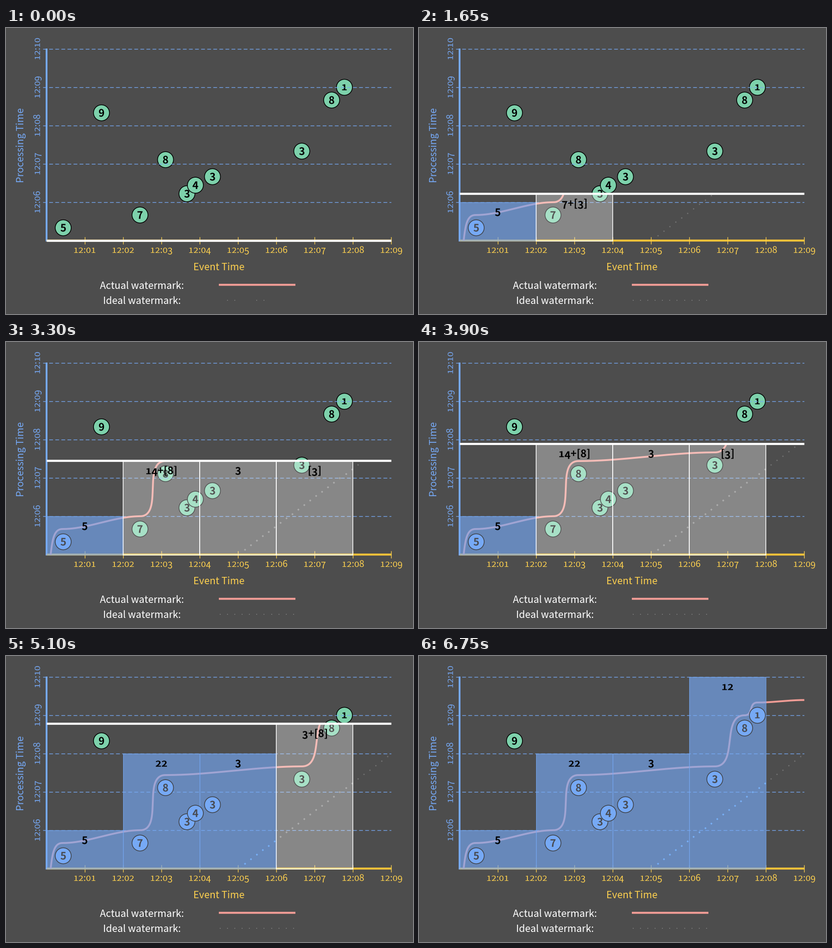
These frames come from a looping animation (893x627 px, 9.75 s). A matplotlib script:

```python
import functools

import matplotlib.pyplot as plt
import numpy as np
from matplotlib.animation import FuncAnimation
from matplotlib.patches import Circle, PathPatch, Rectangle
from matplotlib.path import Path
from matplotlib.textpath import TextPath

W, H, DPI = 893, 627, 64
PT = 72 / DPI                        # points per pixel
FAMILY = "Noto Sans CJK JP"
BACK, BLUE, GREEN, PINK = "#4d4d4d", "#76a9f5", "#7dd1ab", "#f09c95"
AMBER, YELLOW = "#fcc239", "#fdd04f"
X0, Y0, MINUTE_X, MINUTE_Y = 88.5, 466, 84.1, 84
RIGHT = X0 + 9 * MINUTE_X
STEPS = 45                           # frames until the sweep reaches 12:10
FRAMES, INTERVAL = 65, 150
RISE = 5 * MINUTE_Y / STEPS          # pixels the sweep climbs per frame

plt.rcParams["font.family"] = FAMILY
plt.rcParams["lines.scale_dashes"] = False

fig = plt.figure(figsize=(W / DPI, H / DPI), dpi=DPI, facecolor=BACK)
ax = fig.add_axes([0, 0, 1, 1])
ax.set_xlim(0, W)
ax.set_ylim(H, 0)
ax.axis("off")


def line(xs, ys, color, width, z, **kw):
    kw.setdefault("solid_capstyle", "butt")
    return ax.plot(xs, ys, color=color, lw=width * PT, zorder=z, **kw)[0]


def words(x, y, text, color, angle=0):
    ax.text(x, y, text, color=color, fontsize=21.5 * PT, rotation=angle,
            rotation_mode="anchor", ha="center", va="baseline")


# --- old-style figures -------------------------------------------------

@functools.lru_cache(None)
def advance(char, size, font):
    def end(s):
        return TextPath((0, 0), s, size=size, prop=font).get_extents().x1
    return end(char + "1") - end("1")


@functools.lru_cache(None)
def figures(text, size, bold=False):
    """Outline of text (y down), centred on x, baseline at y = 0."""
    font = FAMILY + (":bold" if bold else "")
    parts, x = [], 0
    for char in text:
        glyph = TextPath((0, 0), char, size=size, prop=font)
        v = glyph.vertices.copy()
        if char in "012":
            v[:, 1] *= 0.78
        elif char in "34579":
            v[:, 1] -= 0.17 * size
        v[:, 0] += x
        v[:, 1] *= -1
        parts.append(Path(v, glyph.codes))
        x += advance(char, size, font)
    whole = Path.make_compound_path(*parts)
    return Path(whole.vertices - [x / 2, 0], whole.codes)


def centred(text, x, y):
    path = figures(text, 22.5, True)
    box = path.get_extents()
    mid = [(box.x0 + box.x1) / 2, (box.y0 + box.y1) / 2]
    return Path(path.vertices - mid + [x, y], path.codes)


def add_path(path, color, z):
    return ax.add_patch(PathPatch(path, fc=color, ec="none", lw=0, zorder=z))


# --- static chart ------------------------------------------------------

line([X0, X0], [45, 468], BLUE, 4, 1)
line([X0, RIGHT], [Y0, Y0], AMBER, 4.4, 1.1)

for n in range(1, 10):
    x = X0 + n * MINUTE_X
    line([x, x], [458, 474], YELLOW, 1.4, 1.2)
    path = figures("12:0%d" % n, 19.8)
    add_path(Path(path.vertices + [x, 493], path.codes), YELLOW, 1)

for n in range(1, 6):
    y = Y0 - n * MINUTE_Y
    line([81, RIGHT], [y, y], BLUE, 1.4, 3, dashes=(9.3, 5.7))
    path = figures("12:%02d" % (n + 5), 19.8)
    turned = np.column_stack([path.vertices[:, 1], -path.vertices[:, 0]])
    add_path(Path(turned + [74.5, y], path.codes), BLUE, 1)

words(467, 531, "Event Time", YELLOW)
words(39, 256.5, "Processing Time", BLUE, 90)
words(298.5, 572, "Actual watermark:", "white")
words(298.5, 605, "Ideal watermark:", "white")
line([467, 635], [563, 563], PINK, 4.4, 1)
legend_x = 469.5 + 16.15 * np.arange(11)
legend = line([], [], "#767676", 0, 1, marker="s", ms=2.4 * PT, mew=0)

# --- events ------------------------------------------------------------

# value, x, frame at which the sweep meets it, window (None: too late)
EVENTS = [(5, 125.5, 3, 0), (7, 294, 6, 1), (3, 397, 11, 1), (4, 415.5, 13, 1),
          (3, 453, 15, 2), (8, 350, 19, 1), (3, 649, 21, 3), (9, 209.5, 30, None),
          (8, 714.5, 33, 3), (1, 742.5, 36, 3)]


class Event:
    def __init__(self, order, value, x, step, window):
        y = Y0 - step * RISE
        self.window, self.order = window, order
        self.disc = ax.add_patch(Circle((x, y), 17.5, lw=1.6 * PT))
        self.digit = add_path(centred(str(value), x, y), "black", 2)

    def update(self, i):
        done = self.window is not None and i >= WINDOWS[self.window].close
        z = (6 if done else 2) + self.order * 0.02
        self.disc.set(fc=BLUE if done else GREEN,
                      ec="#3f4248" if done else "black", zorder=z)
        self.digit.set(fc="#484b52" if done else "black", zorder=z + 0.01)


# --- windows -----------------------------------------------------------

class Window:
    def __init__(self, index, close, labels):
        self.left = X0 + 2 * index * MINUTE_X
        self.close, self.labels = close, labels
        self.first = labels[0][0]
        spot = (self.left, Y0)
        self.fill = ax.add_patch(Rectangle(spot, 2 * MINUTE_X, 0, lw=0, zorder=5))
        self.edge = ax.add_patch(Rectangle(spot, 2 * MINUTE_X, 0, fill=False,
                                           zorder=5.5))
        self.label = add_path(centred("0", 0, 0), "black", 8)

    def holds(self, x):
        return (x >= self.left) & (x < self.left + 2 * MINUTE_X)

    def update(self, i):
        parts = (self.fill, self.edge, self.label)
        for part in parts:
            part.set_visible(i >= self.first)
        if i < self.first:
            return
        done = i >= self.close
        top = Y0 - min(i, self.close) * RISE
        self.fill.set(y=top, height=Y0 + 2.2 - top, alpha=0.65 if done else 0.33,
                      fc=BLUE if done else "white")
        self.edge.set(y=top, height=Y0 + (0 if done else 1) - top,
                      ec=BLUE if done else "white",
                      lw=(1.2 if done else 1.6) * PT,
                      alpha=0.8 if done else 1)
        # a finished bottom edge must not cover the tinted axis
        self.edge.set_clip_path(Rectangle((0, 0), W, Y0 - 2.2 if done else H,
                                          transform=ax.transData))
        text = [s for step, s in self.labels if step <= i][-1]
        self.label.set_path(centred(text, self.left + MINUTE_X, top + 22))


WINDOWS = [
    Window(0, 9, [(3, "[5]"), (9, "5")]),
    Window(1, 27, [(6, "[7]"), (9, "7"), (11, "7+[3]"), (13, "7+[3,4]"),
                   (18, "14"), (19, "14+[8]"), (27, "22")]),
    Window(2, 27, [(15, "[3]"), (18, "3")]),
    Window(3, 45, [(21, "[3]"), (27, "3"), (33, "3+[8]"), (36, "12")]),
]
events = [Event(k, *e) for k, e in enumerate(EVENTS)]

# --- watermarks --------------------------------------------------------

def bezier(p0, p1, p2, p3):
    t = np.linspace(0, 1, 80)[:, None]
    p0, p1, p2, p3 = map(np.array, (p0, p1, p2, p3))
    u = 1 - t
    return u**3 * p0 + 3 * u * u * t * p1 + 3 * u * t * t * p2 + t**3 * p3


def s_curve(a, b, pull):
    reach = pull * (b[0] - a[0])
    return bezier(a, (a[0] + reach, a[1]), (b[0] - reach, b[1]), b)


KNOTS = [(124, 410), (294, 382), (350, 261), (649, 242), (714.5, 130),
         (742.5, 102), (RIGHT, 96.5)]
PULLS = [1 / 3, 0.93, 1 / 3, 0.8, 0.7, 1 / 3]
curve = np.vstack([bezier((98, Y0), (102, 430), (106, 410), KNOTS[0])]
                  + [s_curve(a, b, p) for a, b, p in zip(KNOTS, KNOTS[1:], PULLS)])
actual = line([], [], PINK, 4, 4)

dot_x = 524 + 13.03 * np.arange(25)
dot_y = Y0 - 0.75 * (dot_x - X0 - 5 * MINUTE_X)


def dots(color, size, z):
    return line([], [], color, 0, z, marker="D", ms=size * PT, mew=0)


dots_out = dots("#737373", 2.6, 4)
dots_open = dots("#868686", 3.4, 4)
dots_done = dots("#78b0f8", 3.4, 6)

sweep = line([X0, RIGHT], [Y0, Y0], "white", 4.6, 9)


def draw(frame):
    i = min(frame, STEPS)
    y = Y0 - i * RISE
    sweep.set_ydata([y - 0.5, y - 0.5])
    sweep.set_visible(i < STEPS)

    for part in WINDOWS + events:
        part.update(i)

    actual.set_data(*curve[curve[:, 1] >= y].T)
    seen = dot_y >= y
    done = np.zeros(len(dot_x), bool)
    covered = done.copy()
    for w in WINDOWS:
        if i >= w.first:
            covered |= w.holds(dot_x)
        if i >= w.close:
            done |= w.holds(dot_x)
    for group, mask in ((dots_out, ~covered), (dots_open, covered & ~done),
                        (dots_done, done)):
        group.set_data(dot_x[seen & mask], dot_y[seen & mask])

    shown = legend_x if i else legend_x[[1, 2, 5, 6]]
    legend.set_data(shown, np.full(len(shown), 597))
    return []


anim = FuncAnimation(fig, draw, frames=FRAMES, interval=INTERVAL,
                     init_func=lambda: draw(0), repeat=True, blit=False)
plt.show()
```
